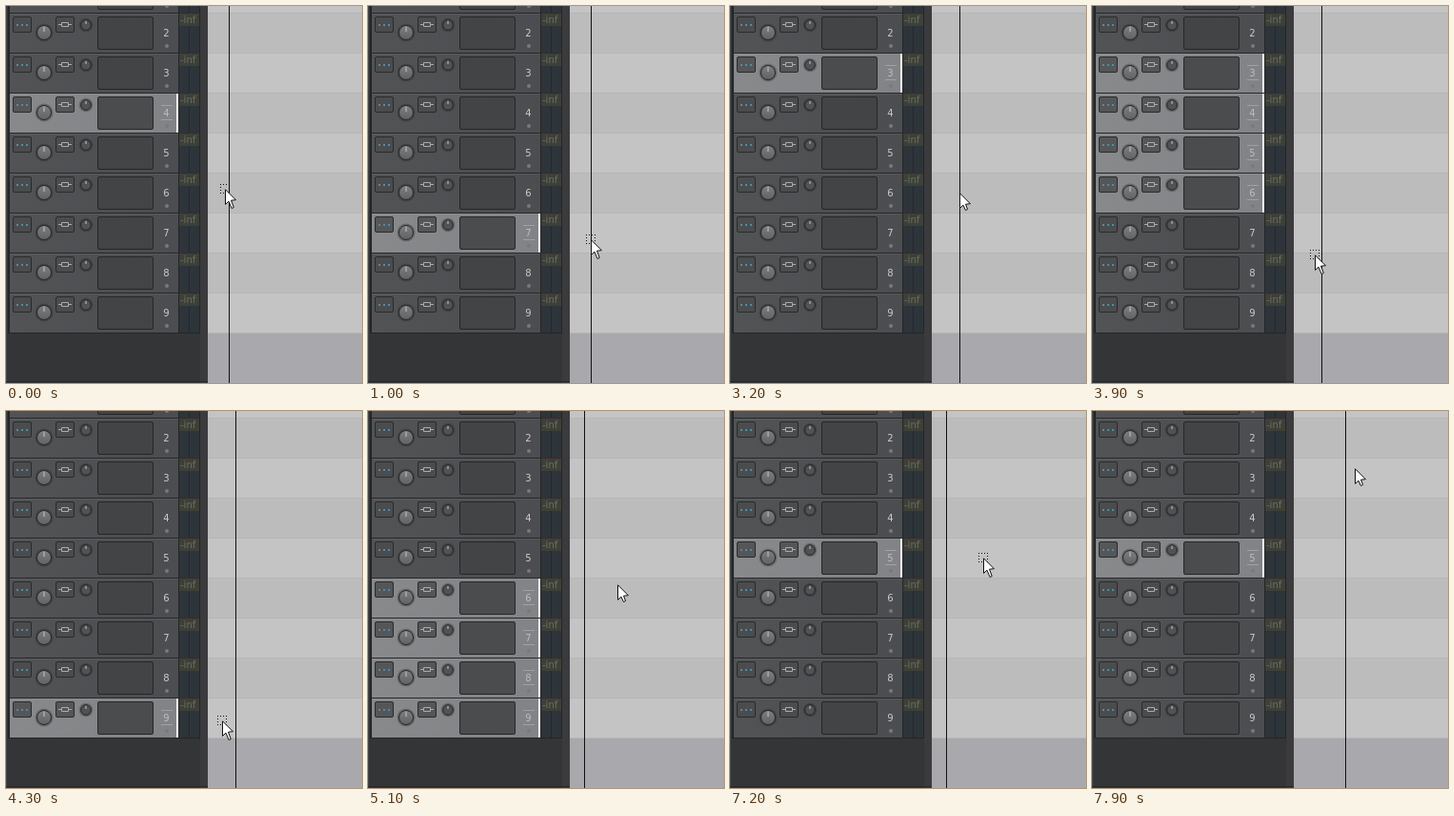
Recreate the animation shown at these times as an HTML page. Size 374 by 396 pixels, loop 8 s.

```html
<!DOCTYPE html>
<html lang="en">
<head>
<meta charset="utf-8">
<title>Track selection</title>
<style>
  html, body { margin: 0; width: 100%; height: 100%; overflow: hidden; background: #343536; }
  svg { display: block; width: 374px; height: 396px; }
  .flat { shape-rendering: crispEdges; }
  text { font: 10px "DejaVu Sans", sans-serif; }
  .panel { fill: url(#plain); }
  .box { fill: #434446; stroke: #252627; }
  .button { fill: #4a4c4e; stroke: #292a2b; }
  .num { fill: #c9cacb; text-anchor: middle; }
  .mark { display: none; }
  .on .panel { fill: url(#lit); }
  .on .box { fill: #4b4c4e; }
  .on .button { fill: #545658; }
  .on .num { fill: #bcbdc0; }
  .on .mark { display: inline; }
</style>
</head>
<body>
<svg viewBox="0 0 374 396">
  <defs>
    <linearGradient id="plain"><stop stop-color="#515355"/><stop offset="1" stop-color="#4b4d50"/></linearGradient>
    <linearGradient id="lit"><stop stop-color="#88898b"/><stop offset="1" stop-color="#818387"/></linearGradient>
    <linearGradient id="knob" x2="0" y2="1"><stop stop-color="#7c7e80"/><stop offset="1" stop-color="#606264"/></linearGradient>
  </defs>
  <g class="flat">
    <rect width="374" height="396" fill="#343536"/>
    <rect width="1" height="396" fill="#444546"/>
    <rect x="2" width="202" height="344" fill="#252627"/>
    <rect x="204" width="8" height="396" fill="#3b3b3d"/>
    <rect y="394" width="212" height="1" fill="#2b2828"/>
    <rect x="212" width="162" height="396" fill="#a9a9ad"/>
  </g>
  <g id="rows"></g>
  <rect id="line" class="flat" width="1" height="396" fill="#111"/>
  <g id="cursor">
    <path id="marquee" class="flat" d="M-5 -4.5H5M-5 4.5H5M-4.5 -5V5M4.5 -5V5"
      stroke="#111" stroke-dasharray="1 2"/>
    <path id="arrow" fill="#fff" stroke="#111" stroke-linejoin="round"/>
  </g>
</svg>
<script>
const $ = id => document.getElementById(id);
const TOP = 8, ROW = 42, LOOP = 8000, STEP = 100;

const rect = (x, y, w, h, colour) =>
  `<rect class="flat" x="${x}" y="${y}" width="${w}" height="${h}" fill="${colour}"/>`;
const frame = (name, x, w, h) =>
  `<rect class="${name}" x="${x}" y="3.5" width="${w}" height="${h}" rx="1.5"/>`;
const dial = (x, y, r, colour) => `
  <circle cx="${x}" cy="${y}" r="${r + 2}" fill="#222" opacity=".3"/>
  <circle cx="${x}" cy="${y}" r="${r}" fill="${colour}" stroke="#252627"/>
  <path d="M${x} ${y - r + 1}v${r - 2}" stroke="#c4c5c6"/>`;

function trackRow(n) {
  return `<g id="track${n}" transform="translate(0 ${TOP + (n - 2) * ROW})">
    <rect class="panel flat" x="4" width="177" height="41"/>
    <rect class="flat" x="4" width="177" height="1" fill="#fff" opacity=".07"/>
    ${frame('button', 7.5, 19, 16)}
    ${[11, 16, 21].map(x => rect(x, 11, 2, 2, '#4d8ea6')).join('')}
    ${frame('button', 52.5, 19, 16)}
    <path d="M55 11.5H59M65 11.5H69M58.5 9.5H65.5V13.5H58.5Z" fill="none" stroke="#a9abad"/>
    ${dial(40, 20, 7.5, 'url(#knob)')}
    ${dial(84, 12, 5.3, '#505254')}
    ${frame('box', 96.5, 58, 34)}
    <g class="mark">
      ${rect(163, 12, 12, 1, '#a0a1a4')}
      ${rect(163, 27, 12, 1, '#a0a1a4')}
      ${rect(179, 0, 2, 41, '#fff')}
    </g>
    <text class="num" x="168.5" y="24">${n}</text>
    <circle cx="169" cy="34" r="2" fill="#77797b"/>
    ${rect(182, 0, 21, 41, '#2d343a')}
    ${rect(182, 0, 21, 13, '#3d4037')}
    ${rect(182, -1, 21, 1, '#3c2a2b')}
    ${rect(192, 13, 1, 28, '#23292d')}
    <text x="183" y="10" fill="#6c6e67">-inf</text>
    ${rect(212, 0, 162, ROW, n % 2 ? '#c4c4c5' : '#bcbcbd')}
    ${rect(212, 41, 162, 1, '#b6b6b8')}
  </g>`;
}

const tracks = Array.from({ length: 9 }, (_, i) => i + 1);
$('rows').innerHTML = tracks.map(trackRow).join('');

// The pointer travels to each stop between two times and may click there.
// Shift extends the selection and hides the marquee.
const stops = [
  { from: 100, to: 100, x: 230, y: 196 },
  { from: 300, to: 500, x: 234, y: 245, click: 1000 },
  { from: 1200, to: 1600, x: 234, y: 116, shift: true },
  { from: 1800, to: 1800, x: 234, y: 112, shift: true, click: 2000 },
  { from: 2400, to: 2500, x: 241, y: 74, click: 2700 },
  { from: 2900, to: 3200, x: 241, y: 196, shift: true, click: 3600 },
  { from: 3800, to: 4100, x: 227, y: 325, click: 4300 },
  { from: 4500, to: 4800, x: 262, y: 182, shift: true, click: 5100 },
  { from: 5300, to: 5600, x: 269, y: 49, shift: true, click: 5800 },
  { from: 5900, to: 6400, x: 266, y: 154, click: 7200 },
  { from: 7400, to: 7500, x: 266, y: 161 },
  { from: 7700, to: 7900, x: 276, y: 60, shift: true }
];

const ease = p => p * p * (3 - 2 * p);
const rowAt = y => 2 + Math.floor((y - TOP) / ROW);

function stateAt(t) {
  const s = { x: 230, y: 192, shift: false, line: 234, anchor: 4, end: 4 };
  for (const { from, to, x, y, click, shift } of stops) {
    if (t < from) break;
    const p = ease(Math.min(1, (t - from + STEP) / (to - from + STEP)));
    s.x += (x - s.x) * p;
    s.y += (y - s.y) * p;
    s.shift = shift;
    if (t >= click) {
      s.end = rowAt(y);
      if (!shift) s.anchor = s.end;
    }
    if (!shift && t >= click + STEP) s.line = x;
  }
  return s;
}

// The marquee pointer has a longer tail than the plain one.
const arrow = tail => `M.5 .8V16.4L4 13.2L${tail / 3 + .3} ${tail}L${tail / 3 + 2.4} ${tail - 1}L6.5 12.2L11.4 11.7Z`;

function draw(now) {
  const t = Math.floor(now % LOOP / STEP) * STEP;
  const { x, y, shift, line, anchor, end } = stateAt(t);
  const first = Math.min(anchor, end), last = Math.max(anchor, end);
  for (const n of tracks) $('track' + n).classList.toggle('on', n >= first && n <= last);
  $('line').setAttribute('x', line);
  $('cursor').setAttribute('transform', `translate(${Math.round(x)} ${Math.round(y)})`);
  $('marquee').style.display = shift ? 'none' : '';
  $('arrow').setAttribute('d', arrow(shift ? 18.5 : 20.5));
}

const began = performance.now();
function tick() {
  draw(performance.now() - began);
  requestAnimationFrame(tick);
}
tick();
</script>
</body>
</html>
```
